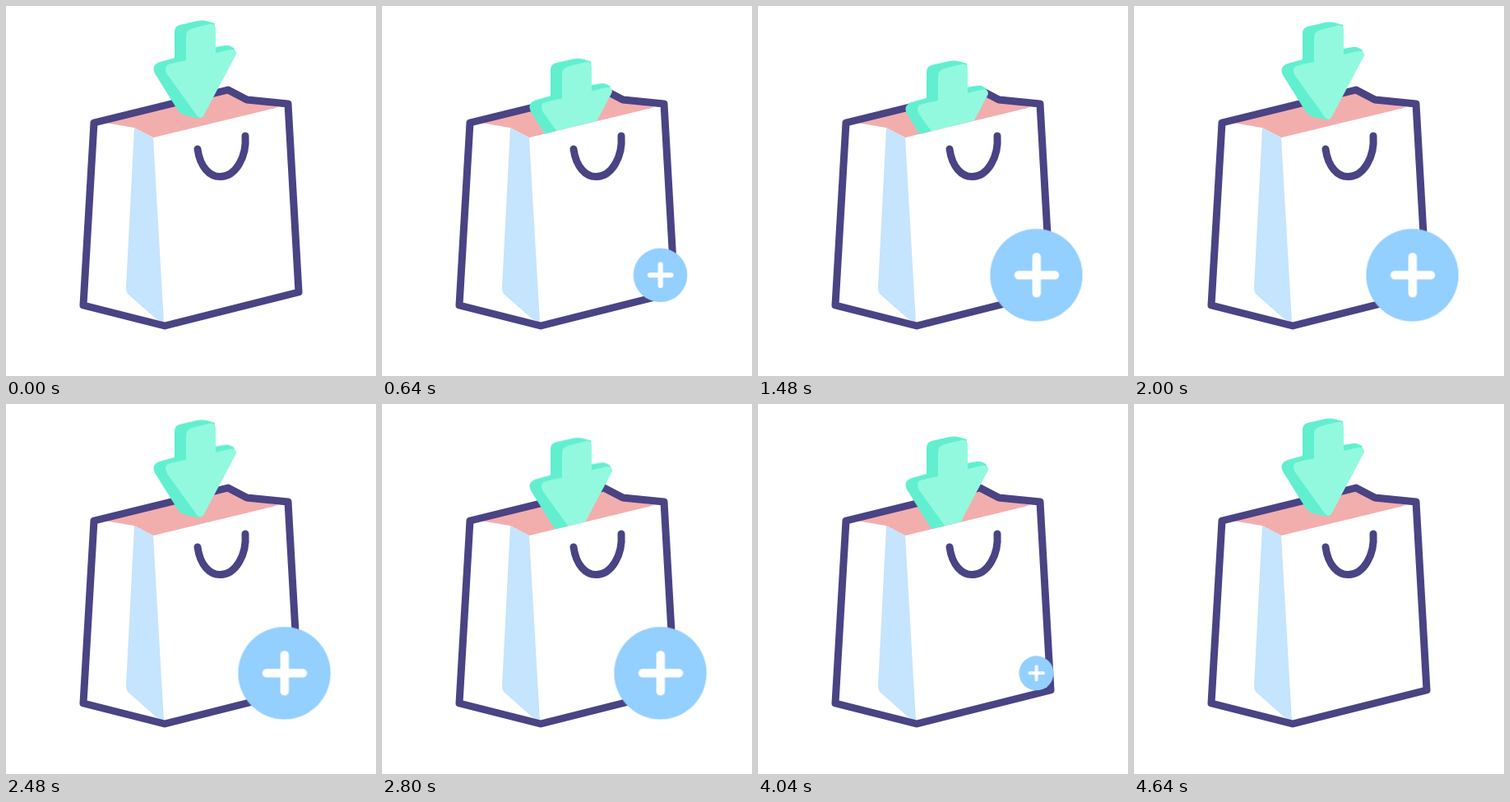
An HTML page without scripts that plays this animation: 450x450 px, repeating every 4680 ms.

```html
<!DOCTYPE html>
<html lang="en">
<head>
<meta charset="utf-8">
<title>Add to bag</title>
<style>
  html, body { margin: 0; width: 100%; height: 100%; overflow: hidden; background: #fff; }
  svg { display: block; width: 100vw; height: 100vh; }

  .line { fill: none; stroke: #4a4384; stroke-width: 9; stroke-linecap: round; stroke-linejoin: round; }
  .plus { fill: none; stroke: #fff; stroke-width: 10.5; stroke-linecap: round; }

  .arrow { animation: dip 2340ms cubic-bezier(.594, 0, .406, 1) -30ms infinite; }
  .badge { animation: pop 4680ms cubic-bezier(.5, 0, .5, 1) infinite; }

  @keyframes dip {
    0%, 94.44%, 100% { transform: translateY(0); }
    46.58%, 47.86% { transform: translateY(61.5px); }
  }
  @keyframes pop {
    0%, 6.28%, 92.31%, 100% { transform: scale(0); }
    19.96%, 78.63% { transform: scale(1); }
  }
</style>
</head>
<body>
<svg viewBox="0 0 450 450">
  <clipPath id="above-front">
    <path d="M100 0H400V106L179 160H100Z"/>
  </clipPath>

  <!-- Bag -->
  <path fill="#f2aead" d="M120 142L269 103 291 116 332 123 179 160 156 148Z"/>
  <path fill="#c5e4fd" d="M156 148L179 160 192 385 183 381 149 351Q146 348 146 342Z"/>
  <path class="line" d="M107 142L270 102 293 114 343 119 356 348 193 389 94 364Z"/>
  <path class="line" d="M233 174C236 196 248 208 261 207.5C279 207 293 184 291 158"/>

  <!-- Arrow, hidden behind the front panel as it sinks -->
  <g clip-path="url(#above-front)">
    <g class="arrow">
      <path fill="#61efd0" d="M205 31Q205 25 211 23L233 18Q238 17 243 18L254 21V50L266 48Q271 47 277 51L280 58 238 136Q230 137 215 132Q209 128 206 122L181 82Q176 72 187 68L205 63Z"/>
      <path fill="#92f9df" d="M219 37Q219 29 227 27L247 22Q255 20 255 28V57L272 53Q282 51 279 60L241 132Q237 139 232 133L196 83Q190 72 201 70L219 66Z"/>
    </g>
  </g>

  <!-- Badge -->
  <g transform="translate(338.5 327.3)">
    <g class="badge">
      <circle r="56.2" fill="#93cfff"/>
      <path class="plus" d="M-21.5 0H22.5M.3 -22V22"/>
    </g>
  </g>
</svg>
</body>
</html>
```
